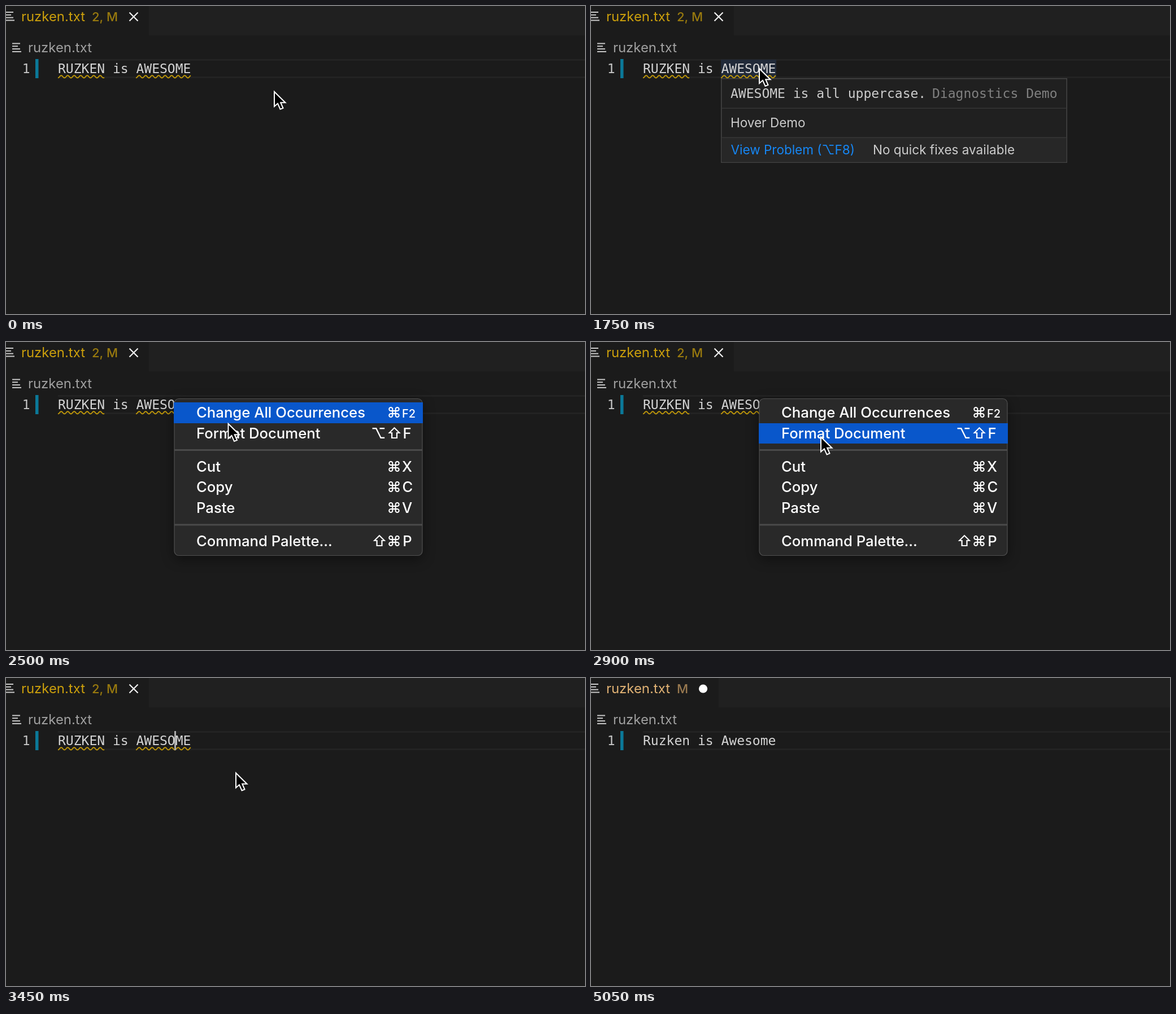
Write an HTML page with a canvas that moves like this. It is 1025 px wide and 546 px high and loops after 5550 ms.

```html
<!DOCTYPE html>
<html lang="en">
<head>
<meta charset="utf-8">
<title>Editor demo</title>
<style>
  html, body { margin: 0; width: 100%; height: 100%; overflow: hidden; background: #1b1b1b; }
  canvas { display: block; }
</style>
</head>
<body>
<canvas id="stage" width="1025" height="546"></canvas>
<script>
const ctx = document.getElementById('stage').getContext('2d');
const LOOP = 5550, STEP = 50;
const SANS = 'Inter, Roboto, sans-serif';
const MONO = '23px "DejaVu Sans Mono", monospace';
const UI = '23.9px ' + SANS, HOVER = '22.5px ' + SANS, MENU = '500 25.7px ' + SANS;
const BG = '#1b1b1b';

// Moments of the story, in ms
const CLICK = 850, HOVER_ON = 1750, MENU_ON = 2100, REFOCUS = 3200,
      MENU_OFF = 3450, EDIT = 3550, CHECKED = 3750, EXIT = 4250;

const easeInOut = p => p * p * (3 - 2 * p);
const easeOut = p => 1 - (1 - p) * (1 - p);
const easeIn = p => p * p;

// Each leg: start, end, end point, easing
const origin = [474, 150];
const legs = [
  [200, 600, [354, 145], easeInOut],
  [1000, 1400, [297, 109], easeInOut],
  [2250, 2500, [392.5, 143], easeOut],
  [2500, 2850, [406, 166.5], easeInOut],
  [3950, 4200, [985, 182], easeIn]
];

function pointerAt(t) {
  let pos = origin;
  for (const [from, to, goal, ease] of legs) {
    if (t <= from) break;
    const p = ease(Math.min(1, (t - from) / (to - from)));
    pos = pos.map((v, i) => v + (goal[i] - v) * p);
  }
  return pos;
}

function rect(x, y, w, h, color) {
  ctx.fillStyle = color;
  ctx.fillRect(x, y, w, h);
}

function text(str, x, y, font, color, align = 'left') {
  ctx.font = font;
  ctx.fillStyle = color;
  ctx.textAlign = align;
  ctx.fillText(str, x, y);
}

function path(points, close) {
  ctx.beginPath();
  points.forEach(([x, y]) => ctx.lineTo(x, y));
  if (close) ctx.closePath();
}

function stroke(color, width) {
  ctx.strokeStyle = color;
  ctx.lineWidth = width;
  ctx.stroke();
}

function fileIcon(x, y) {
  [14, 10, 14, 16].forEach((w, i) => rect(x, y + i * 4.8, w, 2, '#c8c8c8'));
}

function squiggle(x, end) {
  ctx.beginPath();
  for (let i = x; i <= end; i++) {
    ctx.lineTo(i, 125.3 + 2.2 * Math.cos((i - x) * 2 * Math.PI / 11.5));
  }
  stroke('#c39a08', 1.8);
}

function drawTab(t) {
  const dirty = t >= EDIT, clean = t >= CHECKED;
  const width = clean ? 226 : 253;
  rect(width, 0, 1025 - width, 52, '#202020');
  fileIcon(-1, 10);
  text('ruzken.txt', 27, 27, UI, clean ? '#e0b274' : '#cb9f0c');
  text(clean ? 'M' : '2, M', 152, 27, '500 22px ' + SANS, clean ? '#9a7a50' : '#997a0e');
  if (dirty) {
    ctx.beginPath();
    ctx.arc(clean ? 198.5 : 226, 19, 7.6, 0, 7);
    ctx.fillStyle = '#fff';
    ctx.fill();
  } else {
    path([[218.5, 11.5], [233.5, 26.5]]);
    stroke('#f2f2f2', 2.2);
    path([[233.5, 11.5], [218.5, 26.5]]);
    stroke('#f2f2f2', 2.2);
  }
  fileIcon(11, 65.5);
  text('ruzken.txt', 39, 82, UI, '#a0a0a0');
}

function caretAt(t) {
  const lit = since => (t - since) % 1000 < 500;
  if (t >= EDIT) return lit(EDIT) ? 327 : 0;
  if (t >= REFOCUS) return 298;
  return t >= CLICK && t < HOVER_ON && lit(CLICK) ? 327 : 0;
}

function drawLine(t) {
  rect(92, 94, 933, 3, '#232323');
  rect(92, 125, 933, 3, '#232323');
  rect(52, 94, 5.5, 34, '#0b7898');
  text('1', 42.5, 119, MONO, '#c6c6c6', 'right');
  if (t >= HOVER_ON && t < MENU_ON) rect(230, 95, 98, 32, '#212a39');
  text(t < EDIT ? 'RUZKEN is AWESOME' : 'Ruzken is Awesome', 92, 119, MONO, '#d4d4d4');
  if (t < EDIT) {
    squiggle(92, 174);
    squiggle(230, 327);
  }
  const caret = caretAt(t);
  if (caret) rect(caret, 94, 3, 34, '#a9a9a9');
}

function drawHover() {
  rect(230, 128, 613, 150, '#454545');
  rect(231.5, 129.5, 610, 147, '#202020');
  rect(231.5, 233, 610, 43.5, '#272727');
  rect(231.5, 180.5, 610, 1.5, '#363636');
  rect(231.5, 232.5, 610, 1.5, '#363636');
  text('AWESOME is all uppercase.', 247, 163, MONO, '#cccccc');
  text('Diagnostics Demo', 604, 163, MONO, '#808080');
  text('Hover Demo', 247, 215, HOVER, '#cccccc');
  text('View Problem (⌥F8)', 247.5, 263, HOVER, '#1687f5');
  text('No quick fixes available', 499, 263, HOVER, '#cccccc');
}

// Label, centre line, then shortcut glyphs with their centres
const items = [
  ['Change All Occurrences', 125, '⌘', 687],
  ['Format Document', 161.5, '⌥', 659.5, '⇧', 687.5, 'F', 710],
  ['Cut', 220.5, '⌘', 687, 'X', 710],
  ['Copy', 257, '⌘', 687, 'C', 711],
  ['Paste', 293.5, '⌘', 687, 'V', 710],
  ['Command Palette...', 352.5, '⇧', 661, '⌘', 687, 'P', 710.5]
];

function menuBox() {
  ctx.beginPath();
  ctx.roundRect(298, 100.5, 439, 278, 8);
}

function drawMenu(t, [px, py]) {
  const rowTop = i => Math.round(107 + i * 36.5);
  ctx.save();
  ctx.globalAlpha = Math.min(1, (MENU_OFF - t) / (MENU_OFF - REFOCUS) * 1.2);
  ctx.save();
  ctx.shadowColor = 'rgba(0,0,0,.45)';
  ctx.shadowBlur = 22;
  ctx.shadowOffsetY = 6;
  menuBox();
  ctx.fillStyle = '#292929';
  ctx.fill();
  ctx.restore();
  menuBox();
  stroke('#505050', 1.2);

  const blink = t >= 3100 && t < 3150;
  const hot = px < 298 || blink ? -1 : Math.floor((py - 107) / 36.5);
  if (hot === 0 || hot === 1) {
    rect(297, rowTop(hot), 441, rowTop(hot + 1) - rowTop(hot), '#0957cb');
  }
  rect(298, 190, 439, 3, '#4a4a4a');
  rect(298, 322.5, 439, 3, '#4a4a4a');
  for (const [label, y, ...keys] of items) {
    text(label, 337, y + 9, MENU, '#fff');
    for (let i = 0; i < keys.length; i += 2) {
      text(keys[i], keys[i + 1], y + 9, MENU, '#fff', 'center');
    }
  }
  text('F2', 701, 134, '500 20px ' + SANS, '#fff');
  ctx.restore();
}

function drawArrow() {
  path([[1, 2], [1, 28], [7, 22.8], [11.5, 33], [16.5, 31], [12.2, 21.2], [20.5, 21.2]], true);
  ctx.fillStyle = '#000';
  ctx.fill();
  stroke('#fff', 2);
}

function drawBeam() {
  ctx.beginPath();
  for (const s of [-1, 1]) {
    ctx.moveTo(-6, 15 * s);
    ctx.quadraticCurveTo(0, 15 * s, 0, 11 * s);
    ctx.quadraticCurveTo(0, 15 * s, 6, 15 * s);
  }
  ctx.moveTo(0, -12);
  ctx.lineTo(0, 12);
  ctx.moveTo(-3.5, 1);
  ctx.lineTo(3.5, 1);
  stroke('#f0f0f0', 2);
}

function drawPointer(t, [x, y]) {
  if (t >= EXIT) return;
  const beam = (t >= CLICK && t < HOVER_ON) || t > EDIT;
  ctx.save();
  ctx.translate(x, y);
  if (beam) {
    ctx.translate(-1.5, 3);
    drawBeam();
  } else {
    drawArrow();
  }
  ctx.restore();
}

function draw(t) {
  const pointer = pointerAt(t);
  rect(0, 0, 1025, 546, BG);
  drawTab(t);
  drawLine(t);
  if (t >= HOVER_ON && t < MENU_ON) drawHover();
  if (t >= MENU_ON && t < MENU_OFF) drawMenu(t, pointer);
  drawPointer(t, pointer);
}

const start = performance.now();
function tick() {
  const t = (performance.now() - start) % LOOP;
  draw(Math.floor(t / STEP) * STEP);
  requestAnimationFrame(tick);
}
tick();
</script>
</body>
</html>
```
